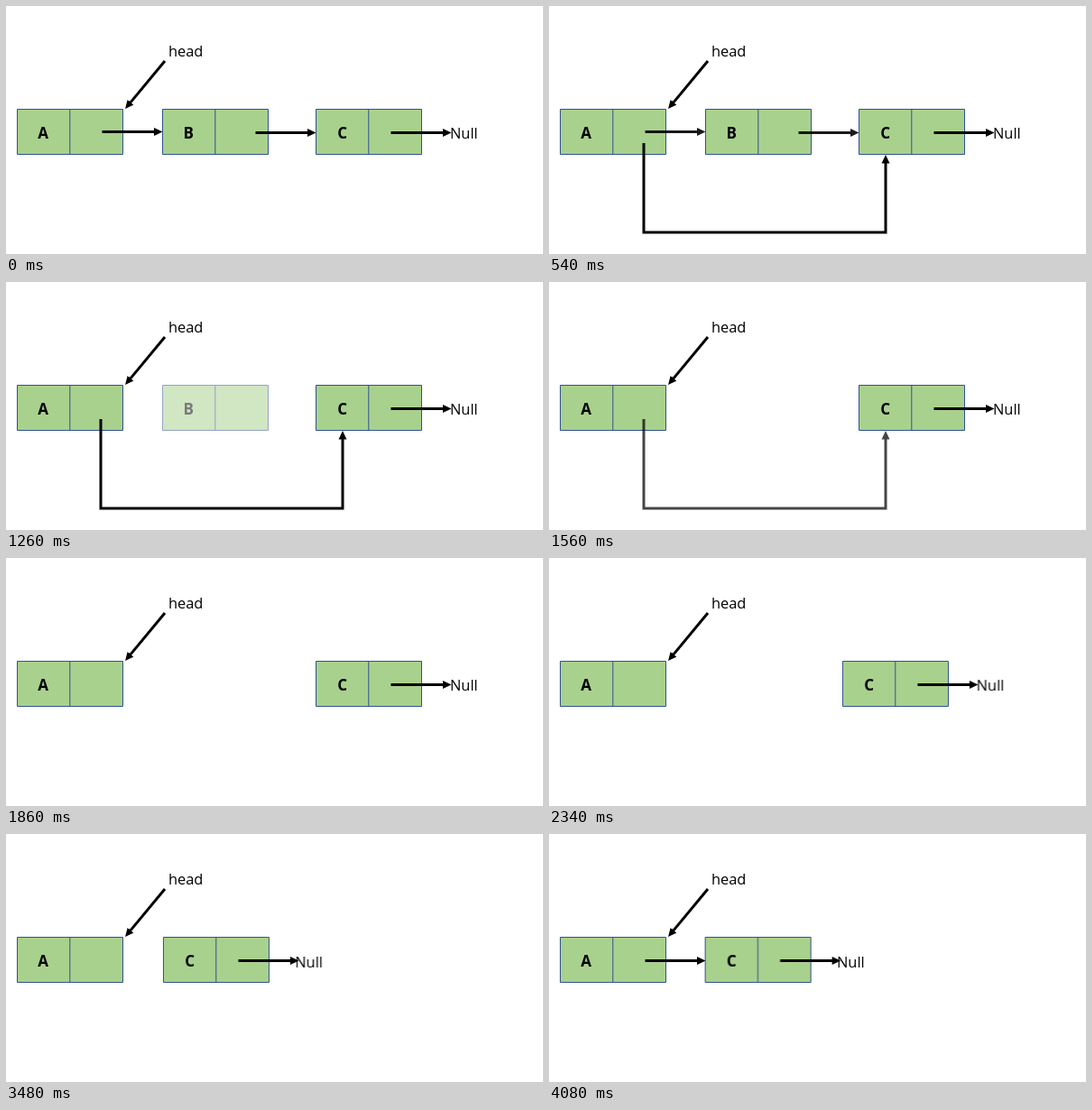
An HTML page for the animation above (4.14 s loop, 595 by 275 pixels).

```html
<!DOCTYPE html>
<html lang="en">
<head>
<meta charset="utf-8">
<title>Linked list: removing a node</title>
<style>
  html, body { margin: 0; width: 100%; height: 100%; overflow: hidden; background: #fff; }
  svg { display: block; width: 595px; height: 275px; }
  text { font: 16.4px "Open Sans", "Noto Sans", sans-serif; fill: #000; }
  .name { font-weight: 700; font-size: 17px; text-anchor: middle; }
  .cell { fill: #a9d18e; stroke: #2f528f; }
  .arrow { fill: none; stroke: #000; stroke-width: 3; marker-end: url(#tip); }

  .bypass, .old, .removed, .new, .next, .end { animation: 4140ms linear infinite; }
  .bypass { animation-name: bypass; }
  .old { animation-name: old; }
  .removed { animation-name: removed; }
  .new { animation-name: new; }
  .next, .end { animation-name: slide; }
  .next { --to: translate(-170.4px, 0); --mid: translate(-85.2px, 0); }
  .end { --to: translate(-173px, 1px); --mid: translate(-86.5px, .5px); }

  @keyframes bypass {
    0%, 1.45% { opacity: 0; }
    11.11%, 35.02% { opacity: 1; }
    44.69%, 100% { opacity: 0; }
  }
  @keyframes old {
    0%, 12.08% { opacity: 1; }
    21.74%, 100% { opacity: 0; }
  }
  @keyframes removed {
    0%, 25.85% { opacity: 1; }
    35.51%, 100% { opacity: 0; }
  }
  @keyframes new {
    0%, 86.96% { opacity: 0; }
    96.62%, 100% { opacity: 1; }
  }
  /* constant acceleration, then constant deceleration */
  @keyframes slide {
    0% { transform: translate(0, 0); }
    47.58% { transform: translate(0, 0); animation-timing-function: cubic-bezier(.3333, 0, .6667, .3333); }
    67.03% { transform: var(--mid); animation-timing-function: cubic-bezier(.3333, .6667, .6667, 1); }
    86.47%, 100% { transform: var(--to); }
  }
</style>
</head>
<body>
<svg viewBox="0 0 595 275">
  <defs>
    <marker id="tip" markerUnits="userSpaceOnUse" markerWidth="10" markerHeight="10" refX="0.5" refY="5" orient="auto">
      <path d="M0 .5L9.5 5L0 9.5Z"/>
    </marker>
    <path id="node" class="cell" d="M.5 .5H117.5V50.5H.5ZM58.8 .5V50.5"/>
  </defs>

  <text x="180" y="56">head</text>
  <path class="arrow" d="M176 61L137.8 107.1"/>

  <use href="#node" x="12" y="114"/>
  <text class="name" x="41.2" y="147">A</text>

  <g class="removed">
    <use href="#node" x="173" y="114"/>
    <text class="name" x="202.2" y="147">B</text>
  </g>

  <g class="next">
    <use href="#node" x="343" y="114"/>
    <text class="name" x="372.6" y="147">C</text>
    <path class="arrow" d="M426.5 140.5H484.5"/>
  </g>
  <text class="end" x="492" y="147">Null</text>

  <g class="old">
    <path class="arrow" d="M106.5 139.5H164.5"/>
    <path class="arrow" d="M276.5 140.5H334.5"/>
  </g>
  <path class="arrow bypass" d="M105 152V251H373V174"/>
  <path class="arrow new" d="M106.5 140.5H164.5"/>
</svg>
</body>
</html>
```
